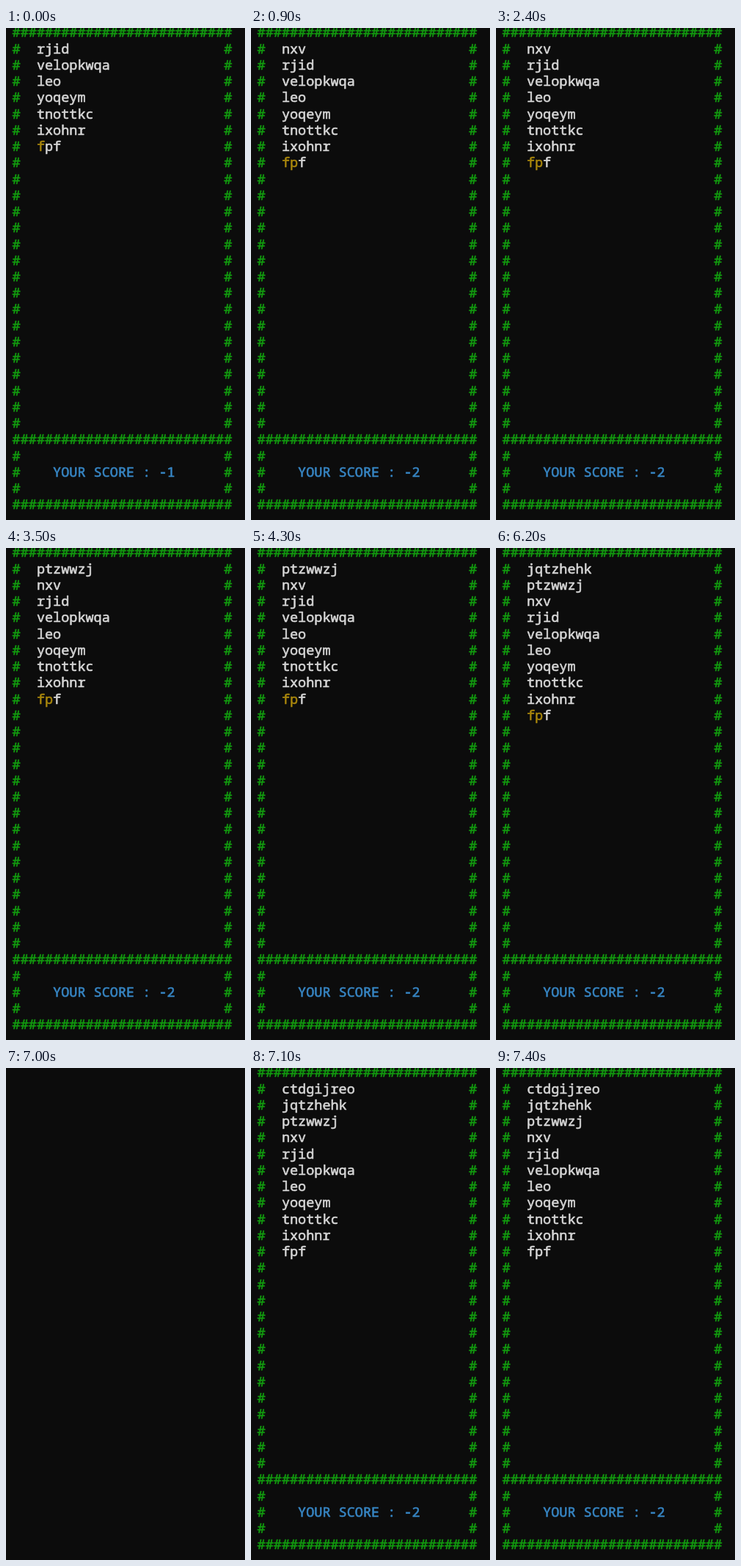
An HTML page with a canvas that plays this animation: 326x672 px, repeating every 8 s.

```html
<!DOCTYPE html>
<html lang="en">
<head>
<meta charset="utf-8">
<title>Falling words</title>
<style>
html, body { margin: 0; width: 100%; height: 100%; overflow: hidden; background: #0c0c0c; }
canvas { display: block; }
</style>
</head>
<body>
<canvas id="screen"></canvas>
<script>
const W = 326, H = 672, LOOP = 8000;
const COLS = 27, ROWS = 30, CELL_W = 11.1, CELL_H = 22.24, LEFT = 8.6, BASE = 12.4;
const DIVIDER = 25, SCORE_ROW = 27;
const COLOR = { back: '#0c0c0c', wall: '#129a0f', word: '#d6d6d6', typed: '#a8860c', score: '#3786c4' };

// Newest word first
const WORDS = ['ctdgijreo', 'jqtzhehk', 'ptzwwzj', 'nxv', 'rjid', 'velopkwqa',
  'leo', 'yoqeym', 'tnottkc', 'ixohnr', 'fpf'];
const DROPS = [900, 3000, 5100, 7000];
const KEY_AT = 100, RESET_AT = 6500, CLEAR_AT = 7000, REDRAW_AT = 7100;

const canvas = document.getElementById('screen');
const ctx = canvas.getContext('2d');
const ratio = window.devicePixelRatio || 1;
canvas.width = W * ratio;
canvas.height = H * ratio;
canvas.style.width = W + 'px';
canvas.style.height = H + 'px';
ctx.scale(ratio, ratio);

// The thin outline gives the strokes their terminal weight
function print(text, col, row, color) {
  ctx.fillStyle = ctx.strokeStyle = color;
  [...text].forEach((ch, i) => {
    const x = LEFT + (col + i) * CELL_W, y = BASE + row * CELL_H;
    ctx.fillText(ch, x, y);
    ctx.strokeText(ch, x, y);
  });
}

function drawWalls() {
  for (let row = 0; row < ROWS; row++) {
    if (row === 0 || row === DIVIDER || row === ROWS - 1) {
      print('#'.repeat(COLS), 0, row, COLOR.wall);
    } else {
      print('#', 0, row, COLOR.wall);
      print('#', COLS - 1, row, COLOR.wall);
    }
  }
}

function drawWords(t) {
  const dropped = DROPS.filter(at => t >= at).length;
  const shown = WORDS.slice(DROPS.length - dropped);
  const typed = t < KEY_AT ? 1 : t < RESET_AT ? 2 : 0;
  shown.forEach((word, i) => {
    const done = i === shown.length - 1 ? typed : 0;
    print(word.slice(0, done), 3, i + 1, COLOR.typed);
    print(word.slice(done), 3 + done, i + 1, COLOR.word);
  });
}

function draw(t) {
  ctx.fillStyle = COLOR.back;
  ctx.fillRect(0, 0, W, H);
  if (t >= CLEAR_AT && t < REDRAW_AT) return;
  ctx.font = '18.5px "Noto Sans Mono", "DejaVu Sans Mono", monospace';
  ctx.lineJoin = 'round';
  ctx.lineWidth = 0.6;
  drawWalls();
  drawWords(t);
  print('YOUR SCORE : ' + (t < KEY_AT ? -1 : -2), 5, SCORE_ROW, COLOR.score);
}

const start = performance.now();
function tick() {
  draw((performance.now() - start) % LOOP);
  requestAnimationFrame(tick);
}
tick();
</script>
</body>
</html>
```
